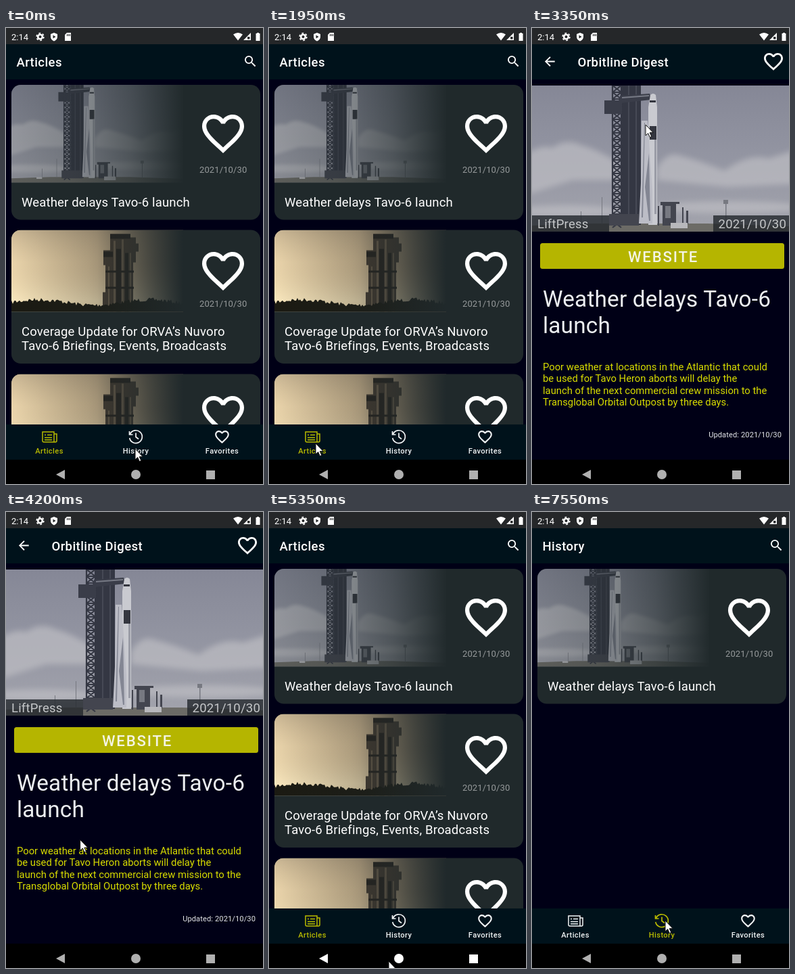
Animation of 380 by 674 pixels, one loop 7600 ms. Source, as an HTML page:

```html
<!DOCTYPE html>
<html lang="en">
<head>
<meta charset="utf-8">
<title>News app</title>
<style>
html, body { margin: 0; height: 100%; overflow: hidden; background: #000016; }
svg { display: block; width: 100vw; height: 100vh; font-family: Roboto, sans-serif; }
.head { font-size: 18.5px; font-weight: 500; letter-spacing: .42px; }
.card { font-size: 18.5px; letter-spacing: .16px; }
.date { font-size: 13px; letter-spacing: .12px; fill: #969a9b; }
.label { font-size: 18.5px; letter-spacing: .2px; fill: #c4c6c8; }
.tab { font-size: 11.1px; font-weight: 500; letter-spacing: .4px; text-anchor: middle; }
</style>
</head>
<body>
<svg viewBox="0 0 380 674" fill="#fff">
<defs>
  <linearGradient id="sky" x2="0" y2="1">
    <stop stop-color="#858796"/><stop offset=".45" stop-color="#9294a1"/><stop offset="1" stop-color="#a3a4ad"/>
  </linearGradient>
  <linearGradient id="dusk" x2="1" y2="0">
    <stop stop-color="#f3dfb6"/><stop offset=".45" stop-color="#d8c19a"/><stop offset="1" stop-color="#7c6c5a"/>
  </linearGradient>
  <linearGradient id="duskTop" x2="0" y2="1">
    <stop stop-color="#8a7860" stop-opacity=".4"/><stop offset=".4" stop-color="#c8ab80" stop-opacity=".2"/>
    <stop offset=".85" stop-color="#ffefc4" stop-opacity=".5"/>
  </linearGradient>
  <linearGradient id="shade">
    <stop stop-color="#20292b" stop-opacity=".2"/><stop offset=".35" stop-color="#20292b" stop-opacity=".34"/>
    <stop offset=".68" stop-color="#20292b" stop-opacity=".62"/><stop offset="1" stop-color="#20292b"/>
  </linearGradient>
  <linearGradient id="shade2">
    <stop stop-color="#20292b" stop-opacity="0"/><stop offset=".5" stop-color="#20292b" stop-opacity=".24"/>
    <stop offset="1" stop-color="#20292b"/>
  </linearGradient>
  <filter id="soft" x="-30%" y="-60%" width="160%" height="220%"><feGaussianBlur stdDeviation="4"/></filter>
  <clipPath id="photoBox"><path d="M0 0h380v216H0z"/></clipPath>
  <clipPath id="listBox"><path d="M0 76h380v510H0z"/></clipPath>
  <clipPath id="tall"><path d="M8 229V98a14 14 0 0 1 14-14h240v145z"/></clipPath>
  <clipPath id="wide"><path d="M0 121V14A14 14 0 0 1 14 0h240v121z"/></clipPath>

  <path id="heart" d="M16.5 3c-1.74 0-3.41.81-4.5 2.09C10.91 3.81 9.24 3 7.5 3 4.42 3 2 5.42 2 8.5c0 3.78 3.4 6.86 8.55 11.54L12 21.35l1.45-1.32C18.6 15.36 22 12.28 22 8.5 22 5.42 19.58 3 16.5 3zm-4.4 15.55l-.1.1-.1-.1C7.14 14.24 4 11.39 4 8.5 4 6.5 5.5 5 7.5 5c1.54 0 3.04.99 3.57 2.36h1.87C13.46 5.99 14.96 5 16.5 5c2 0 3.5 1.5 3.5 3.5 0 2.89-3.14 5.74-7.9 10.05z"/>

  <g id="pad" clip-path="url(#photoBox)">
    <path fill="url(#sky)" d="M0 0h380v216H0z"/>
    <g fill="#bbbbc1" filter="url(#soft)" opacity=".75">
      <path d="M-20 110Q10 85 30 92Q50 78 72 88Q90 92 125 112V140H60L-20 165z"/>
      <path d="M185 122Q200 96 220 104Q250 112 285 126Q320 100 350 108L400 92V145L290 150 185 140z"/>
      <ellipse cx="50" cy="186" rx="80" ry="9"/><ellipse cx="290" cy="180" rx="110" ry="9"/>
    </g>
    <path fill="#6c6b66" d="M0 207l90-3h170l120 4v8H0z"/>
    <path fill="#343743" d="M133 0h28v206h-28z"/>
    <path fill="#464955" d="M142 0h2v206h-2zM153 0h2v206h-2z"/>
    <path id="lattice" fill="none" stroke="#343743" stroke-width="2.200"/>
    <path fill="#3a3d49" d="M107 22h26v20h-26zM130 15l44-3 2 9-46 5z"/>
    <path fill="#777a85" d="M133 17l40-3v2l-40 3z"/>
    <path fill="#c9cad0" d="M172 32l3-18q4-4 8 0l2 18v174h-13z"/>
    <path fill="#34363f" d="M174 60h10v20h-10zM174 22h9v3h-9z"/>
    <path fill="#9a9ca6" d="M181 80h3v110h-3z"/>
    <path fill="#bcbdc6" d="M162 52h9l7 106v46h-20l3-60z"/>
    <path fill="#838693" d="M166 55h1l-3 140h-2zM173 100l2 100h-2l-6-50z"/>
    <path fill="#43454f" d="M114 190h44v17h-44zM186 178h2v29h-2zM190 172h28v3h-5v32h-20v-30h-3zM222 180h2v24h-2zM228 185h3v20h-3z"/>
    <path fill="#777981" d="M197 178h8v18h-8zM103 165h1v40h-1zM286 170h1.500v36h-1.500zM283 169h7v6h-7zM72 186h1v20h-1z"/>
    <path fill="#b8b8bc" d="M205 203h25v8h-25zM60 204h12v4H60z"/>
  </g>
  <g id="evening" clip-path="url(#wide)">
    <path fill="url(#dusk)" d="M0 0h254v121H0z"/><path fill="url(#duskTop)" d="M0 0h254v121H0z"/>
    <path fill="#463c31" d="M146 6h30v5h8v9h4v12h-4v16h-4v73h-45V92h4V52h-3V30h10z"/>
    <path fill="#6f604c" d="M151 16h3v105h-3zM163 14h3v107h-3zM175 34h2v87h-2zM143 54h2v67h-2z"/>
    <path fill="#26221d" d="M146 6h30v7h-30zM136 32h14v8h-14zM155 28h7v93h-7zM168 34h5v87h-5zM139 60h42v3h-42zM139 84h42v3h-42z"/>
    <path id="trees" fill="#1b1a12"/>
    <path fill="url(#shade2)" d="M0 0h254v121H0z"/>
  </g>

  <g id="first">
    <rect x="8" y="84" width="368" height="199.500" rx="14" fill="#20292b"/>
    <g clip-path="url(#tall)">
      <use href="#pad" transform="translate(3.600 79.500) scale(.69)"/>
      <path fill="url(#shade)" d="M8 84h256v145H8z"/>
    </g>
    <use href="#heart" transform="translate(283.800 118.700) scale(3.100)"/>
    <text class="date" x="286" y="214.300">2021/10/30</text>
    <text class="card" x="23" y="263.500">Weather delays Tavo-6 launch</text>
  </g>
  <g id="second">
    <rect x="8" y="298.500" width="368" height="197.500" rx="14" fill="#20292b"/>
    <use href="#evening" x="8" y="298.500"/>
    <use href="#heart" transform="translate(283.800 321.700) scale(3.100)"/>
    <text class="date" x="286" y="411.500">2021/10/30</text>
    <text class="card" x="23" y="454.500">Coverage Update for ORVA’s Nuvoro</text>
    <text class="card" x="23" y="476.200">Tavo-6 Briefings, Events, Broadcasts</text>
  </g>
</defs>

<path fill="#000016" d="M0 0h380v674H0z"/>
<g clip-path="url(#listBox)">
  <g id="list"><use href="#first"/><use href="#second"/><use href="#second" y="213"/></g>
  <g id="seen"><use href="#first"/></g>
  <text id="empty" x="192" y="134" font-size="22.200" font-weight="700" text-anchor="middle" fill="#bcbe00">List is empty</text>
</g>

<g id="detail">
  <use href="#pad" y="85"/>
  <path fill="#22272c" fill-opacity=".8" d="M0 277h114v24H0zM268 277h112v24H268z"/>
  <text class="label" x="8" y="295.500">LiftPress</text>
  <text class="label" x="376" y="295.500" text-anchor="end">2021/10/30</text>
  <rect x="12" y="318" width="361" height="38" rx="3.500" fill="#b5b500"/>
  <text x="194" y="345.500" font-size="22.200" font-weight="500" letter-spacing="1.800" text-anchor="middle" fill="#f4f4e4">WEBSITE</text>
  <g font-size="33.300" letter-spacing=".2" fill="#eceef0">
    <text x="16" y="412">Weather delays Tavo-6</text><text x="16" y="451">launch</text>
  </g>
  <g font-size="14.800" fill="#d8dc00">
    <text x="16" y="506">Poor weather at locations in the Atlantic that could</text>
    <text x="16" y="523.300">be used for Tavo Heron aborts will delay the</text>
    <text x="16" y="540.700">launch of the next commercial crew mission to the</text>
    <text x="16" y="558">Transglobal Orbital Outpost by three days.</text>
  </g>
  <text x="369" y="604.500" font-size="11.100" letter-spacing=".1" text-anchor="end" fill="#e4e6e8">Updated: 2021/10/30</text>
</g>

<g id="nav">
  <path fill="#00121b" d="M0 586h380v52H0z"/>
  <g id="tab0">
    <path fill="none" stroke="currentColor" stroke-width="1.500" d="M54 597h17v15H56q-2 0-2-2zM71 600h4v10q0 2-2 2h-2M61 601.500h7M57 605.500h11M57 608.800h11M57 601.500h2"/>
    <text class="tab" x="64" y="628.700" fill="currentColor">Articles</text>
  </g>
  <g id="tab1">
    <path fill="none" stroke="currentColor" stroke-width="1.700" d="M183.500 600a9.400 9.400 0 1 1-.8 6M182.500 596v5h5M192 598.500v6l4 3"/>
    <text class="tab" x="192" y="628.700" fill="currentColor">History</text>
  </g>
  <g id="tab2">
    <use href="#heart" fill="currentColor" transform="translate(307.100 592) scale(1.030)"/>
    <text class="tab" x="319.500" y="628.700" fill="currentColor">Favorites</text>
  </g>
</g>

<path fill="#00121b" d="M0 24h380v52H0z"/>
<text id="title" class="head" y="57.300"></text>
<path id="back" transform="translate(15.300 38.500) scale(.92)" d="M20 11H7.830l5.590-5.590L12 4l-8 8 8 8 1.410-1.410L7.830 13H20v-2z"/>
<path id="search" transform="translate(350.200 38.200) scale(.93)" d="M15.500 14h-.79l-.28-.27A6.470 6.470 0 0 0 16 9.500 6.500 6.500 0 1 0 9.500 16c1.610 0 3.090-.59 4.230-1.570l.27.28v.79l5 4.990L20.490 19zm-6 0a4.500 4.500 0 1 1 0-9 4.500 4.500 0 0 1 0 9z"/>
<use id="like" href="#heart" transform="translate(340.200 32.800) scale(1.400)"/>

<path fill="#252729" d="M0 0h380v24H0z"/>
<text x="8" y="18" font-size="13">2:14</text>
<circle cx="50.500" cy="13" r="3.300" fill="none" stroke="#fff" stroke-width="2.600"/>
<circle cx="50.500" cy="13" r="5.400" fill="none" stroke="#fff" stroke-width="1.600" stroke-dasharray="2.830"/>
<path d="M71 7l5 2v4q0 4-5 6.500-5-2.500-5-6.500V9zM90 7h6v12h-9v-9zM336 9.500q7-5 14 0l-7 9zM362 7v11h-11zM369.500 8h1.500V7h3v1h1.500v11h-6z"/>
<path fill="#252729" d="M69.500 10.500l4 2.500-4 2.500zM90 9h1v3h-1zM92 9h1v3h-1zM94 9h1v3h-1zM357 13h3.500v3.500H357z"/>

<path d="M0 638h380v36H0z" fill="#000"/>
<rect id="ripple" x="32" y="637" width="99" height="46" rx="23" fill="#202020"/>
<g id="keys"><path d="M87 653v14l-13-7zM296 654h13v13h-13z"/><circle cx="192" cy="660" r="7"/></g>

<g id="pointer">
  <circle id="touch" cy="2" r="10" fill="#b9bcc0" fill-opacity=".6"/>
  <path stroke="#111" d="M0 0v16l3.700-3.400 2.600 6 2.500-1.100-2.600-5.800h5z"/>
</g>
</svg>
<script>
const $ = id => document.getElementById(id);
const set = (id, name, value) => $(id).setAttribute(name, value);
const ramp = (t, from, to) => Math.min(1, Math.max(0, (t - from) / (to - from)));
const within = (t, a, b) => t >= a && t < b;

// Tower braces and the tree line
let braces = 'M119 0V206M132 0V206';
for (let y = 0; y < 206; y += 10) braces += `M119 ${y}h13l-13 10M119 ${y}l13 10`;
set('lattice', 'd', braces);

let seed = 7, line = 'M0 121';
const random = () => (seed = seed * 16807 % 2147483647) / 2147483647;
for (let x = 0; x <= 254; x += 2) line += `L${x} ${104 - 4 * Math.sin(x / 26) + 6 * random()}`;
set('trees', 'd', line + 'V121z');

const LOOP = 7600;
const path = [[0, 191, 622], [600, 191, 622], [1250, 69, 614], [2400, 69, 614], [2770, 168, 143],
  [3730, 168, 143], [4500, 80, 658], [5120, 80, 658], [5350, 177, 664], [5900, 197, 604], [LOOP, 197, 604]];
const titles = [[0, 'Articles'], [150, 'History'], [1450, 'Articles'], [2960, 'Orbitline Digest'],
  [4800, 'Articles'], [6150, 'History']];
const presses = [[50, 170], [1290, 1450], [2920, 3040], [6050, 6200]];

function pointerAt(t) {
  const i = path.findIndex(p => p[0] > t), [t0, x0, y0] = path[i - 1], [t1, x1, y1] = path[i];
  const u = ramp(t, t0, t1), e = u * u * (3 - 2 * u);
  return [x0 + (x1 - x0) * e, y0 + (y1 - y0) * e];
}

function draw(now) {
  const t = now % LOOP;
  const title = titles.filter(k => k[0] <= t).pop()[1];
  const reading = title === 'Orbitline Digest';
  const toEmpty = ramp(t, 180, 400) - ramp(t, 1480, 1700);
  const toSeen = ramp(t, 6180, 6400);
  const opened = ramp(t, 3040, 3260);

  set('list', 'opacity', 1 - toEmpty - toSeen - opened + ramp(t, 4800, 4890));
  set('empty', 'opacity', toEmpty);
  set('seen', 'opacity', toSeen);
  set('detail', 'opacity', opened - ramp(t, 4870, 5120));
  // The page shrinks to the list area as soon as the tabs return
  set('detail', 'clip-path', reading ? 'none' : 'url(#listBox)');
  set('nav', 'transform', `translate(0 ${52 * (ramp(t, 3040, 3240) - ramp(t, 4850, 5050))})`);

  $('title').textContent = title;
  set('title', 'x', reading ? 67.5 : 15.5);
  set('back', 'opacity', +reading);
  const liked = within(t, 3040, 4800);
  set('like', 'opacity', +liked);
  set('search', 'opacity', +!liked);

  const active = title === 'History' ? 1 : 0;
  for (let i = 0; i < 3; i++) set('tab' + i, 'color', i === active ? '#b9bb00' : '#f2f4f5');

  set('ripple', 'opacity', ramp(t, 4620, 4760) - ramp(t, 4960, 5200));
  set('keys', 'fill', within(t, 4600, 5750) ? '#fff' : '#b0b0b0');
  set('pointer', 'transform', `translate(${pointerAt(t)})`);
  set('touch', 'opacity', +presses.some(([a, b]) => within(t, a, b)));
}

let start;
function tick(now) {
  start ??= now;
  draw(now - start);
  requestAnimationFrame(tick);
}
draw(0);
requestAnimationFrame(tick);
</script>
</body>
</html>
```
